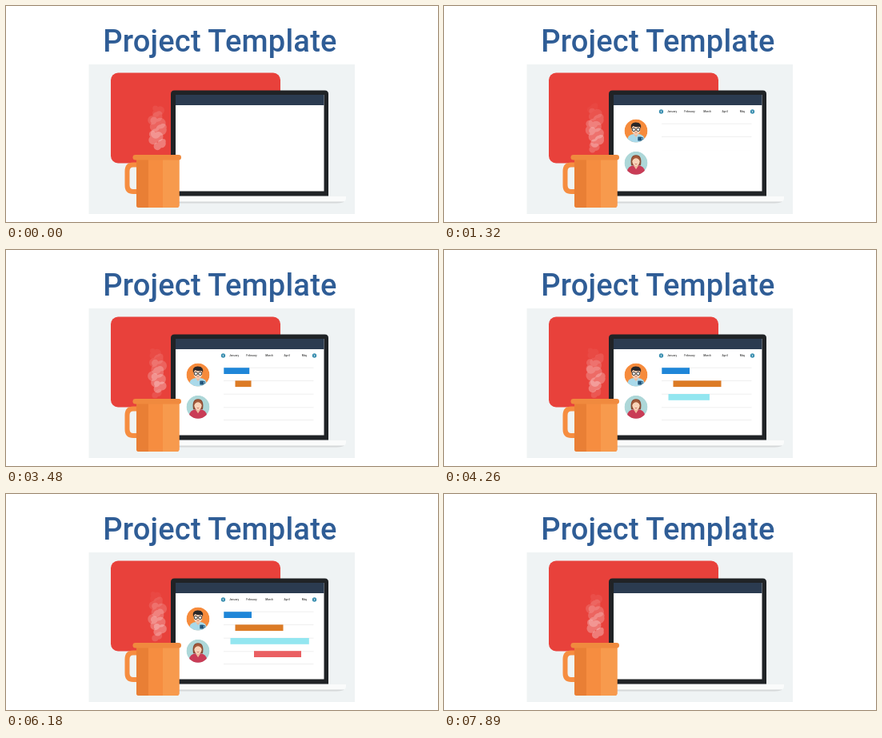
These frames come from a looping animation (540 px wide and 270 px high, 7.92 s). An HTML page:

```html
<!DOCTYPE html>
<html lang="en">
<head>
<meta charset="utf-8">
<title>Project Template</title>
<style>
  html, body { margin: 0; width: 100%; height: 100%; overflow: hidden; background: #fff; }
  svg { display: block; width: 100vw; height: 100vh; }
  text { font-family: Roboto, Inter, sans-serif; font-weight: 500; }
</style>
</head>
<body>
<svg viewBox="0 0 540 270">
  <defs>
    <clipPath id="disc"><circle r="14.5"/></clipPath>
    <filter id="soft" x="-30%" y="-30%" width="160%" height="160%"><feGaussianBlur stdDeviation=".7"/></filter>
  </defs>

  <text x="121.3" y="57.3" font-size="38" letter-spacing=".2" fill="#2f5d96">Project Template</text>
  <rect x="103.5" y="73" width="332.5" height="187" fill="#eff3f4"/>
  <rect x="131" y="83.5" width="212" height="113" rx="9" fill="#e8413b"/>

  <!-- laptop -->
  <path d="M206 237.5V110q0-4.500 4.500-4.500h188q4.500 0 4.500 4.500v127.500z" fill="#202326"/>
  <rect x="212" y="111" width="185.500" height="120.500" fill="#fff"/>
  <rect x="212" y="111" width="185.500" height="13" fill="#2b3b50"/>
  <path d="M190 238h235v3q0 4-8 5H190z" fill="#fafbfb"/>
  <path d="M190 244.500h233q-2 1.700-9 2H190z" fill="#d5d8d9"/>

  <g id="screen">
    <g id="lines" stroke="#ebebeb" stroke-width=".8"></g>
    <g id="header" fill="#444" font-size="3.400" text-anchor="middle"></g>
    <g id="bars"></g>

    <g class="avatar" clip-path="url(#disc)">
      <circle r="14.5" fill="#f68b3c"/>
      <path d="M-11 15V11Q-10 5-3 4H3Q10 5 11 11V15z" fill="#a9d9ea"/>
      <path d="M-2.500 2H2.500V5L0 8L-2.500 5z" fill="#eebb9d"/>
      <ellipse cy="-1.500" rx="5.400" ry="6.200" fill="#f8d3b8"/>
      <path d="M-6-2Q-8-10-1-10.500Q8-11 6-2L5-5Q0-4-4-6z" fill="#2b2728"/>
      <g fill="#fff" stroke="#262626" stroke-width="1">
        <circle cx="-2.700" cy="-1.500" r="2"/><circle cx="2.700" cy="-1.500" r="2"/>
      </g>
      <path d="M-1.500 2.300H1.500" stroke="#b95e50" stroke-width=".7"/>
      <rect x="2.300" y="7.500" width="4.700" height="5" rx=".6" fill="#24567c"/>
      <path d="M7 8.500h1.500v2.500H7" fill="none" stroke="#24567c" stroke-width=".8"/>
    </g>

    <g class="avatar" clip-path="url(#disc)">
      <circle r="14.5" fill="#add7d8"/>
      <path d="M-6 3Q-8-10 0-10Q8-10 6 3z" fill="#8a4a32"/>
      <path d="M-11 15V10Q-10 4-3 3H3Q10 4 11 10V15z" fill="#c93c56"/>
      <path d="M-2.500 1H2.500V4L0 8L-2.500 4z" fill="#eebb9d"/>
      <ellipse cy="-2" rx="4.700" ry="5.600" fill="#f8d3b8"/>
      <path d="M-5-2Q-5-9 0-9Q5-9 5-2Q3-6 0-6Q-3-6-5-2z" fill="#a55a3a"/>
      <path d="M-1.300 1.300H1.300" stroke="#c0524d" stroke-width=".7"/>
    </g>
  </g>

  <g id="steam" fill="#fff" filter="url(#soft)"></g>

  <!-- mug -->
  <path d="M164 198.500h-5q-7.500 0-7.500 8v17.500q0 8 7.500 8h5" fill="none" stroke="#f68d40" stroke-width="6"/>
  <path d="M163 189h53.500v60q0 3-3 3h-47.500q-3 0-3-3z" fill="#f68d40"/>
  <path d="M163 189h15v63h-12q-3 0-3-3z" fill="#e97f35"/>
  <path d="M196 189h20.500v60q0 3-3 3H196z" fill="#f79a4d"/>
  <rect x="158.500" y="186" width="60.500" height="6.500" rx="3.200" fill="#f08a3e"/>
</svg>
<script>
const LOOP = 7920;
const NS = 'http://www.w3.org/2000/svg';
const byId = id => document.getElementById(id);

function add(parent, tag, attrs, text) {
  const el = document.createElementNS(NS, tag);
  set(el, attrs);
  if (text) el.textContent = text;
  parent.appendChild(el);
  return el;
}
function set(el, attrs) {
  for (const key in attrs) el.setAttribute(key, attrs[key]);
}
const progress = (t, start, length) => Math.min(1, Math.max(0, (t - start) / length));
const easeOut = u => 1 - (1 - u) ** 2;
const backOut = u => 1 + 2.7 * (u - 1) ** 3 + 1.7 * (u - 1) ** 2;

const lines = [147.2, 163.5, 180.2, 196.8, 212.5].map(y =>
  add(byId('lines'), 'line', { x1: 272, x2: 384.5, y1: y, y2: y }));

const header = byId('header');
['January', 'February', 'March', 'April', 'May'].forEach((name, i) =>
  add(header, 'text', { x: 285 + 22 * i, y: 133.4 }, name));
[[271.5, -1], [385.5, 1]].forEach(([x, dir]) => {
  add(header, 'circle', { cx: x, cy: 132, r: 2.7, fill: '#3b8fb0' });
  add(header, 'path', {
    d: `M${x - .6 * dir} 130.800l${1.2 * dir} 1.200l${-1.2 * dir} 1.200`,
    fill: 'none', stroke: '#fff', 'stroke-width': .7
  });
});

const bars = [
  { x: 272.3, y: 147.2, width: 34.7, start: 2852, fill: '#1f86d8' },
  { x: 286.5, y: 163.3, width: 60, start: 3320, fill: '#dc7b25' },
  { x: 280.5, y: 180, width: 98.3, start: 3990, fill: '#93e6f0' },
  { x: 310, y: 196.2, width: 59, start: 4660, fill: '#ea5f62' }
];
for (const bar of bars) {
  bar.el = add(byId('bars'), 'rect', { x: bar.x, y: bar.y, height: 7.8, fill: bar.fill });
}

const avatars = [...document.querySelectorAll('.avatar')];

// Each puff is one outline made of three overlapping circles.
const disc = (x, y, r) => `M${x - r} ${y}a${r} ${r} 0 1 0 ${2 * r} 0a${r} ${r} 0 1 0 ${-2 * r} 0`;
const puffs = Array.from({ length: 7 }, (_, i) => add(byId('steam'), 'path', {
  d: disc(-3, 2, 5.5) + disc(3, -2, 6) + disc(i % 2 ? 5 : -4, -5, 4)
}));

function draw(t) {
  avatars.forEach((el, i) => {
    const grow = backOut(progress(t, 220 + 200 * i, 400));
    const scale = grow * (1 - progress(t, 7560 + 60 * i, 220) ** 2);
    set(el, {
      transform: `translate(240 ${156 + 40.3 * i}) scale(${scale})`,
      visibility: scale > .001 ? 'visible' : 'hidden'
    });
  });

  const leave = 1 - progress(t, 7480, 220);
  header.setAttribute('opacity', progress(t, 880, 240) * leave);
  lines.forEach((el, i) => el.setAttribute('opacity', progress(t, 1120 + 95 * i, 90) * leave));

  for (const bar of bars) {
    const size = easeOut(progress(t, bar.start, 876)) * (1 - progress(t, 7200, 300) ** 2);
    bar.el.setAttribute('width', bar.width * size);
  }

  puffs.forEach((el, i) => {
    const u = (t / 2640 + i / puffs.length) % 1;
    const x = 190.5 - 3 * u + 2.5 * Math.sin(u * 9 + i);
    const size = .65 + .5 * Math.sin(Math.PI * u);
    set(el, {
      transform: `translate(${x} ${182 - 58 * u}) scale(${size})`,
      opacity: .34 * (1 - u) * Math.min(1, u * 8) + .04 * Math.sin(Math.PI * u)
    });
  });
}

const origin = performance.now();
function tick() {
  draw((performance.now() - origin) % LOOP);
  requestAnimationFrame(tick);
}
draw(0);
requestAnimationFrame(tick);
</script>
</body>
</html>
```
